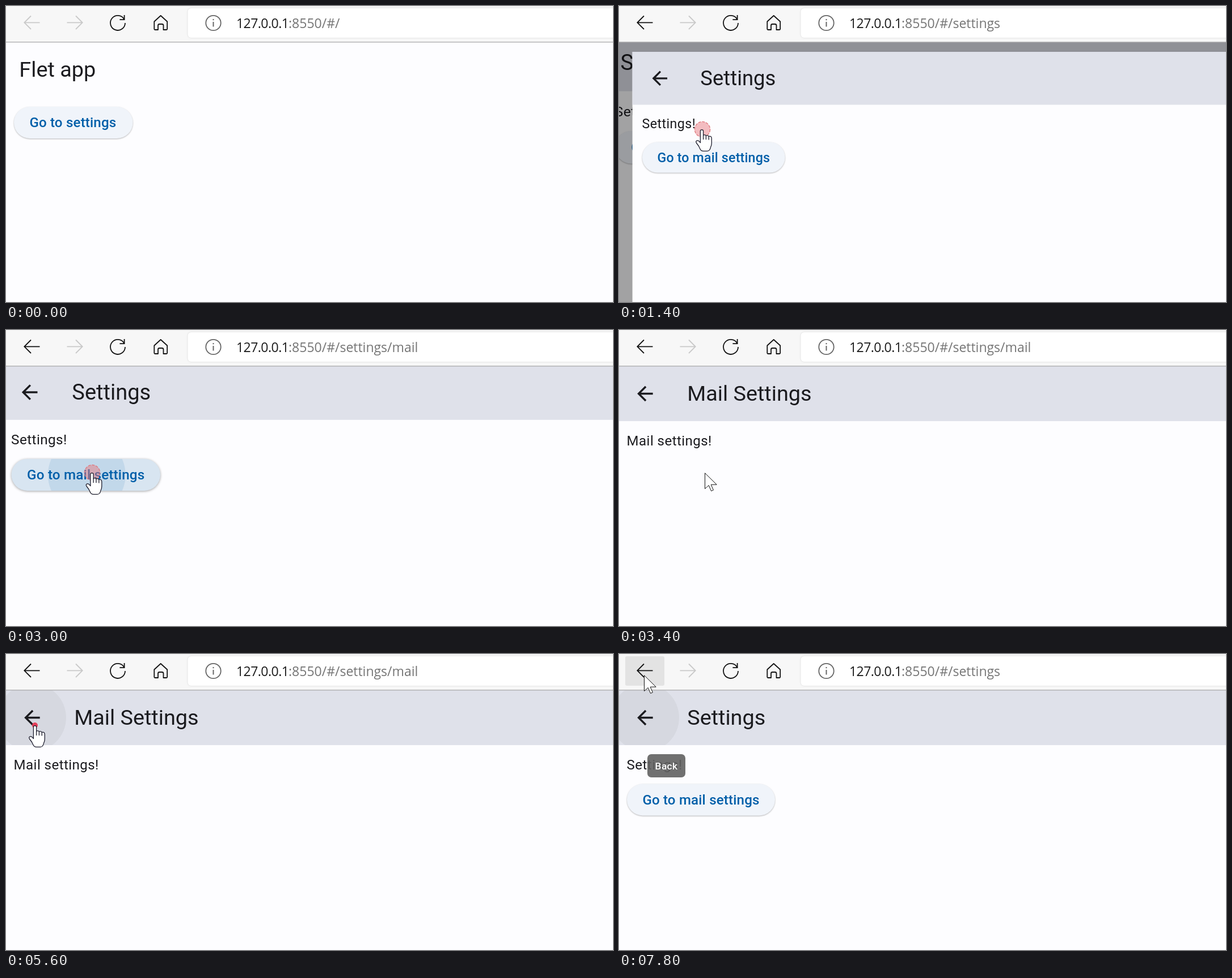
Write an HTML page that moves like this. It is 1070 px wide and 523 px high and loops after 8000 ms.

```html
<!DOCTYPE html>
<html lang="en">
<head>
<meta charset="utf-8">
<title>Navigation demo</title>
<style>
html, body { margin: 0; width: 100%; height: 100%; overflow: hidden; background: #fdfdff; }
svg { display: block; width: 1070px; height: 523px; }
text { white-space: pre; }
.url { font: 400 23px "Open Sans", "Noto Sans", sans-serif; }
.title { font: 400 37.8px Roboto, sans-serif; fill: #1b1b1f; }
.body { font: 400 24.1px Roboto, sans-serif; letter-spacing: .43px; fill: #1b1b1f; }
.label { font: 500 24.1px Roboto, sans-serif; letter-spacing: .17px; fill: #005fa9; }
.tip { font: 500 17.2px Roboto, sans-serif; letter-spacing: .43px; fill: #fff; }
.btn { fill: #f0f4fa; filter: drop-shadow(0 1px 1.2px rgba(0,0,0,.28)); }
.btn.hover { fill: #d8e5f1; filter: drop-shadow(0 1px 2.2px rgba(0,0,0,.36)); }
.line { fill: none; stroke-width: 1.8; }
</style>
</head>
<body>
<svg viewBox="0 0 1070 523" xmlns="http://www.w3.org/2000/svg">
  <defs>
    <clipPath id="bar"><rect x="-4" y="64" width="1536" height="97"/></clipPath>
    <clipPath id="pill0"><rect x="14" y="178" width="209.5" height="56" rx="28"/></clipPath>
    <clipPath id="pill1"><rect x="14" y="229.5" width="261" height="56" rx="28"/></clipPath>
  </defs>
  <g id="pages"></g>
  <g id="chrome">
    <rect width="1070" height="64" fill="#f7f7f7"/>
    <rect y="63" width="1070" height="1.5" fill="#b4b4b6"/>
    <rect id="press" x="11" y="4" width="69" height="52" rx="3" fill="#e3e3e3"/>
    <rect x="320.5" y="4" width="780" height="52" rx="6" fill="#fff" style="filter:drop-shadow(0 0 1.5px rgba(0,0,0,.14))"/>
    <path id="prev" class="line" d="M59.5 29.3H32.5M44 17.5L32.3 29.3L44 41"/>
    <path class="line" stroke="#c9c9c9" d="M107.5 29.3H134.5M123 17.5L134.7 29.3L123 41"/>
    <path class="line" stroke="#111" d="M208 23A13 13 0 1 0 210 30M208.6 16V24.2H200.4"/>
    <path class="line" stroke="#111" stroke-linejoin="round" d="M261.3 27.5L272.7 17L284.2 27.5V40.5Q284.2 42 282.7 42H277.5V34.5Q277.5 32 275 32H270.5Q268 32 268 34.5V42H262.8Q261.3 42 261.3 40.5Z"/>
    <circle class="line" cx="365.5" cy="30" r="13.2" stroke="#666"/>
    <path d="M365.5 28V36.5M365.5 23V25.2" stroke="#666" stroke-width="2"/>
    <text class="url" x="406" y="39" fill="#1a1a1a" letter-spacing="-.55">127.0.0.1</text>
    <text class="url" id="path" x="498" y="39" fill="#757575"></text>
  </g>
  <g id="over"></g>
</svg>
<script>
const LOOP = 8000;
const $ = id => document.getElementById(id);

const text = (cls, x, y, s) => `<text class="${cls}" x="${x}" y="${y}">${s}</text>`;

// Pages zoom about the centre of the full browser view
const zoom = (s, content) =>
  `<g transform="matrix(${s} 0 0 ${s} ${764 * (1 - s)} ${536 * (1 - s)})">${content}</g>`;

const sheet = '<rect x="-4" y="64" width="1540" height="960" fill="#fdfdff"/>';
const scrim = a => `<rect y="64" width="1070" height="459" opacity="${a}"/>`;

function button(i, label, hover, ripple) {
  const y = [178, 229.5][i], w = [209.5, 261][i];
  const wave = ripple
    ? `<circle cx="${[122, 146][i]}" cy="${y + 28}" r="68" fill="#005fa9" opacity=".1" clip-path="url(#pill${i})"/>` : '';
  return `<rect class="btn ${hover ? 'hover' : ''}" x="14" y="${y}" width="${w}" height="56" rx="28"/>`
    + wave + text('label', 41.4, y + 36.3, label);
}

function appBar(title, back, glow) {
  let s = '<rect x="-4" y="64" width="1540" height="97" fill="#dfe1ea"/>';
  if (glow) s += '<circle cx="46" cy="112.5" r="60" fill="#d6d8e0" clip-path="url(#bar)"/>';
  if (back) s += '<path transform="translate(25.3 91.9) scale(1.72)" fill="#1b1b1f" d="M20 11H7.83l5.59-5.59L12 4l-8 8 8 8 1.41-1.41L7.83 13H20z"/>';
  return s + text('title', back ? 120.2 : 23.3, 125, title);
}

const home = (o = {}) =>
  sheet + text('title', 23.3, 125, 'Flet app') + button(0, 'Go to settings', o.hover, o.ripple);

const settings = (o = {}) =>
  sheet + appBar('Settings', !o.root, o.glow) + text('body', 13.6, 204, 'Settings!')
  + button(1, 'Go to mail settings', o.hover, o.ripple);

const mail = (o = {}) =>
  sheet + appBar('Mail Settings', true, o.glow) + text('body', 13.6, 204, 'Mail settings!');

// A new page growing over a darkened one
const enter = (s, under, dark, page) => under + scrim(dark) + zoom(s, page);

const arrow = (x, y) =>
  `<path transform="translate(${x} ${y})" fill="#fff" stroke="#111" d="M.5 .8V28.5L7.2 22.5L11.6 32.5L15.4 30.8L11.2 21.2H21.2Z"/>`;

const hand = (x, y) =>
  `<g transform="translate(${x} ${y})" stroke="#1c1c2c" stroke-width="1.3" stroke-linejoin="round">
  <path fill="#fff" d="M8.4 3.2Q8.4 .7 11 .7Q13.6 .7 13.6 3.2V10.2Q16.6 8.6 18.4 11Q21.5 9.7 23.3 12.3Q28.3 11.3 28.3 16.5V24Q28.3 28 26.5 31.5Q25.2 38.3 20.5 38.3H13.5Q9.8 38.3 8.2 35L5.5 29.5L1.5 24Q-.3 21 2.3 19.8Q4.6 19 6.8 21.6L8.4 23.5Z"/>
  <path fill="none" d="M13.6 10V18M18.4 11V18M23.3 12.3V18.5"/></g>`;

const dot = (x, y) => `<circle cx="${x}" cy="${y}" r="5" fill="#e5405a"/>`;
const ring = (x, y) =>
  `<circle cx="${x}" cy="${y}" r="13.6" fill="#e8767c" fill-opacity=".48" stroke="#e0777c" stroke-width="1.3" stroke-dasharray="5 2"/>`;

const tip = (x, y, a = 1) =>
  `<g opacity="${a}"><rect x="${x}" y="${y}" width="67" height="41" rx="7" fill="#616161" opacity=".9"/>${text('tip', x + 13.6, y + 27, 'Back')}</g>`;

const S = 'settings', M = 'settings/mail';
const backTip = tip(50, 177);

// [start, path, pages, overlay, toolbar press]
const steps = [
  [0, '', home(), ''],
  [200, '', home(), arrow(124, 285)],
  [400, '', home(), arrow(141, 230)],
  [600, '', home({ hover: 1 }), hand(135, 218)],
  [1200, '', home({ hover: 1, ripple: 1 }), dot(147, 218) + hand(135, 218)],
  [1400, S, enter(.964, zoom(1.028, settings({ root: 1 })), .36, settings()), ring(147, 218) + hand(135, 218)],
  [1600, S, settings(), hand(135, 218)],
  [2000, S, settings(), arrow(147, 239)],
  [2200, S, settings({ hover: 1 }), hand(140, 247)],
  [2400, S, settings({ hover: 1 }), hand(140.5, 252)],
  [3000, M, zoom(1.006, settings({ hover: 1, ripple: 1 })), ring(152, 252) + hand(140.5, 252)],
  [3200, M, enter(.996, settings(), .36, mail()), hand(140.5, 252)],
  [3400, M, mail(), arrow(151, 252)],
  [4600, M, mail(), arrow(122, 223)],
  [4800, M, mail(), arrow(80, 159)],
  [5000, M, mail({ glow: 1 }), tip(15, 154) + hand(40, 126)],
  [5600, M, mail({ glow: 1 }), dot(51, 126) + hand(40, 126)],
  [5800, S, enter(.96, zoom(1.028, settings({ root: 1 })), .36, settings({ glow: 1 })),
    tip(50, 177, .5) + ring(51, 126) + hand(40, 126)],
  [6000, S, settings({ glow: 1 }), backTip + hand(40, 126)],
  [7400, S, settings({ glow: 1 }), backTip + hand(39, 69)],
  [7600, S, settings({ glow: 1 }), backTip + arrow(44, 37), .6],
  [7800, S, settings({ glow: 1 }), backTip + arrow(44, 37), 1]
];

let shown;
function draw(now) {
  const t = now % LOOP;
  const step = steps.filter(s => s[0] <= t).pop();
  if (step === shown) return;
  shown = step;
  const [, path, pages, over, press = 0] = step;
  $('pages').innerHTML = pages;
  $('over').innerHTML = over;
  $('path').textContent = ':8550/#/' + path;
  $('prev').setAttribute('stroke', path ? '#111' : '#c9c9c9');
  $('press').setAttribute('opacity', press);
}

const start = performance.now();
function tick() {
  draw(performance.now() - start);
  requestAnimationFrame(tick);
}
tick();
</script>
</body>
</html>
```
